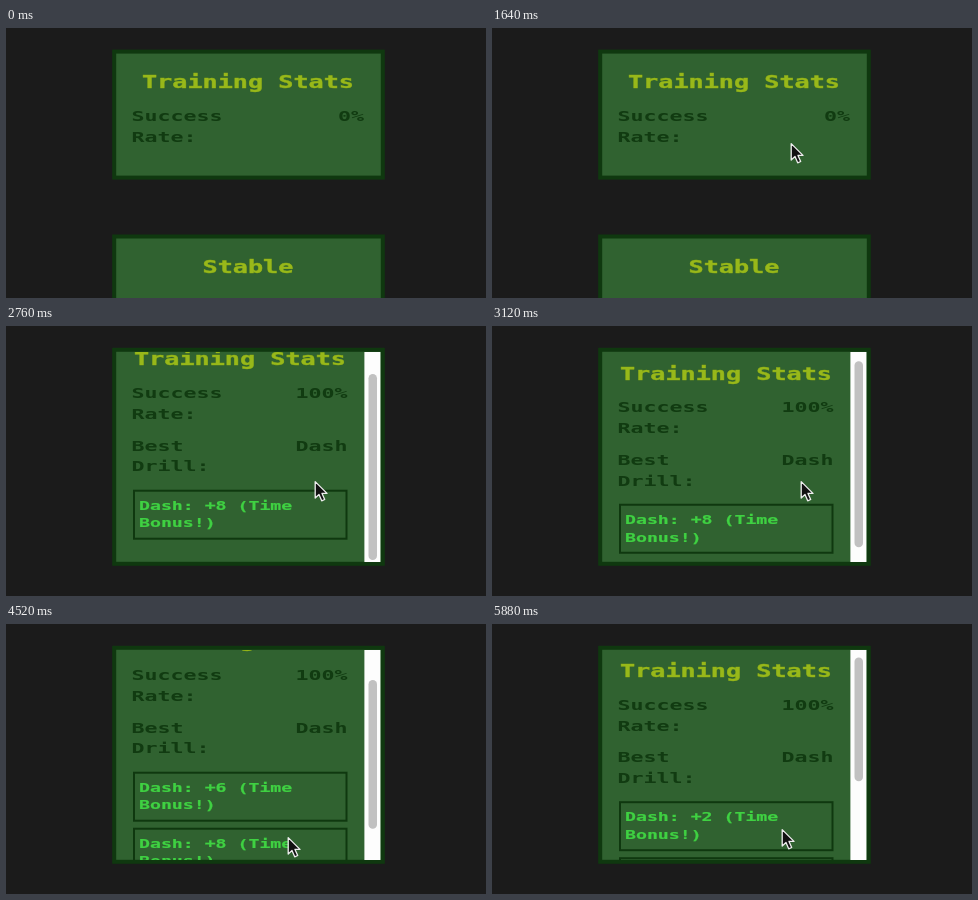
Animation of 480x270 px, one loop 6400 ms. Source, as an HTML page:

```html
<!DOCTYPE html>
<html lang="en">
<head>
<meta charset="utf-8">
<title>Training Stats</title>
<style>
  @property --scroll { syntax: "<number>"; inherits: true; initial-value: 0; }
  @property --rows { syntax: "<number>"; inherits: true; initial-value: 1; }

  html, body { margin: 0; width: 100%; height: 100%; overflow: hidden; background: #1b1b1b; }
  svg { display: block; }

  .panel { fill: #306230; stroke: #0f380f; stroke-width: 4; }

  /* Wide terminal lettering, one proportion for all text */
  text {
    font-family: "DejaVu Sans Mono", monospace;
    font-size: 14.6px;
    font-weight: bold;
    fill: #113b11;
    transform-box: fill-box;
    transform-origin: left;
    transform: scaleX(1.48);
  }
  .title {
    font-size: 17px;
    fill: #98b81a;
    stroke: #98b81a;
    stroke-width: .4;
    text-anchor: middle;
    transform-origin: center;
    filter: drop-shadow(.5px .7px 0 #0f380f60);
  }
  .value { text-anchor: end; transform-origin: right; }
  .entry text { font-size: 12.3px; fill: #3fd142; stroke: #3fd142; stroke-width: .2; }
  .entry rect { fill: none; stroke: #0f380f; stroke-width: 2; }

  .closed { animation: closed 6.4s step-end infinite; }
  .open {
    --full: calc(175 + 56 * var(--rows));
    animation: open 6.4s step-end infinite, rows 6.4s step-end infinite, scroll 6.4s linear infinite;
  }
  .content { transform: translateY(calc(var(--scroll) * -1px)); }
  .list { transform: translateY(calc((var(--rows) - 3) * 56px)); }
  .thumb {
    height: calc(44100px / var(--full) - 5px);
    transform: translateY(calc(var(--scroll) * 210px / var(--full)));
  }
  .cursor { animation: show 6.4s step-end infinite, move 6.4s ease-in-out infinite; }

  @keyframes closed { 0% { visibility: visible } 28.125%, 100% { visibility: hidden } }
  @keyframes open { 0% { visibility: hidden } 28.125%, 100% { visibility: visible } }
  @keyframes show { 0% { visibility: hidden } 8.125%, 100% { visibility: visible } }
  @keyframes rows {
    0% { --rows: 1 }
    63.75% { --rows: 2 }
    84.375%, 100% { --rows: 3 }
  }
  @keyframes scroll {
    0%, 30.625% { --scroll: 0 }
    40.625%, 43.75% { --scroll: 21 }
    51.25%, 63.75% { --scroll: 0 }
    70.625%, 71.25% { --scroll: 37 }
    78.125%, 78.75% { --scroll: 68 }
    80.625%, 83.75% { --scroll: 77 }
    91.875%, 100% { --scroll: 7.5 }
  }
  @keyframes move {
    0%, 8.125% { transform: translate(329px, 45px) }
    17.5%, 20% { transform: translate(10px, 226px) }
    25.625%, 26.875% { transform: translate(300px, 115px) }
    31.25% { transform: translate(309px, 152px) }
    43.125%, 51.25% { transform: translate(310px, 155px) }
    60.625%, 62.5% { transform: translate(280px, 218px) }
    70.625%, 71.25% { transform: translate(283px, 213px) }
    78.125%, 78.75% { transform: translate(289px, 206px) }
    91.875%, 100% { transform: translate(291px, 205px) }
  }
</style>
</head>
<body>
<svg width="480" height="270" viewBox="0 0 480 270">
  <clipPath id="view"><rect x="110" y="26" width="248.4" height="210"/></clipPath>
  <clipPath id="log"><rect x="110" y="184" width="248" height="180"/></clipPath>

  <g class="closed">
    <rect class="panel" x="108.2" y="23.6" width="268.6" height="126"/>
    <text class="title" x="242" y="60.5">Training Stats</text>
    <text x="125.5" y="93.4">Success</text>
    <text x="125.5" y="114.2">Rate:</text>
    <text class="value" x="358" y="93.4">0%</text>
    <rect class="panel" x="108.2" y="208.5" width="268.6" height="126"/>
    <text class="title" x="242" y="245">Stable</text>
  </g>

  <g class="open">
    <rect class="panel" x="108.2" y="23.8" width="268.6" height="214"/>
    <g clip-path="url(#view)">
      <g class="content">
        <text class="title" x="234" y="60.5">Training Stats</text>
        <text x="125.5" y="93.4">Success</text>
        <text x="125.5" y="114.2">Rate:</text>
        <text class="value" x="341.5" y="93.4">100%</text>
        <text x="125.5" y="145.7">Best</text>
        <text x="125.5" y="166.5">Drill:</text>
        <text class="value" x="341.5" y="145.7">Dash</text>
        <g clip-path="url(#log)">
          <g class="list">
            <g class="entry">
              <rect x="128" y="185.7" width="212.5" height="48"/>
              <text x="133" y="205">Dash: +2 (Time</text>
              <text x="133" y="222.5">Bonus!)</text>
            </g>
            <g class="entry" transform="translate(0 56)">
              <rect x="128" y="185.7" width="212.5" height="48"/>
              <text x="133" y="205">Dash: +6 (Time</text>
              <text x="133" y="222.5">Bonus!)</text>
            </g>
            <g class="entry" transform="translate(0 112)">
              <rect x="128" y="185.7" width="212.5" height="48"/>
              <text x="133" y="205">Dash: +8 (Time</text>
              <text x="133" y="222.5">Bonus!)</text>
            </g>
          </g>
        </g>
      </g>
    </g>
    <rect x="358.4" y="26" width="16" height="210" fill="#fdfdfd"/>
    <rect class="thumb" x="362.5" y="29" width="8.5" rx="4.25" fill="#c1c1c1"/>
  </g>

  <g class="cursor">
    <path d="M-.8 .6V17L3 13.5L5.7 19.8L8.7 18.5L6 12.4H11Z"
          fill="#111" stroke="#eee" stroke-width="1.3" stroke-linejoin="round"/>
  </g>
</svg>
</body>
</html>
```
